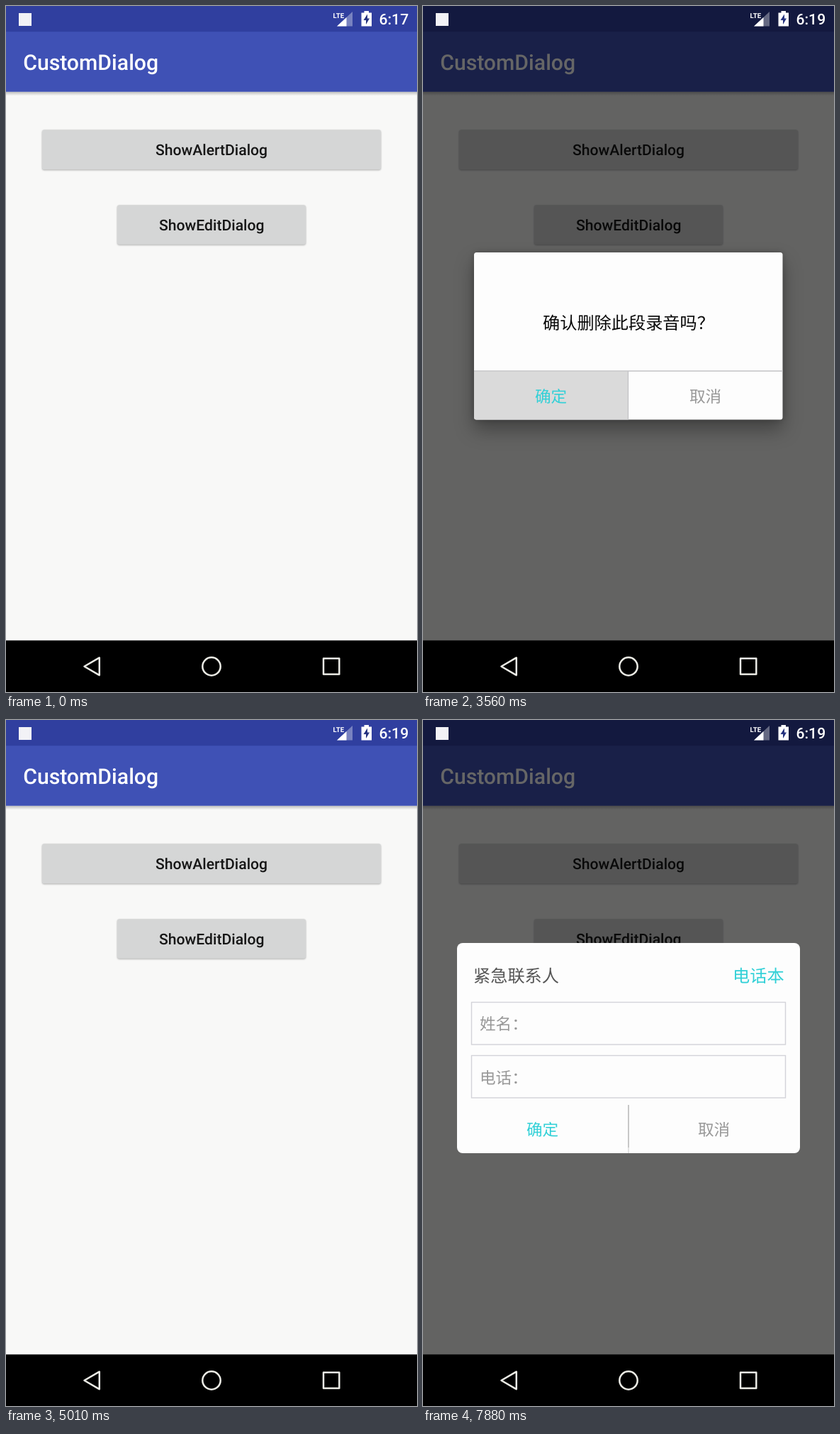
An HTML page for the animation above (8 s loop, 580 by 966 pixels).

```html
<!DOCTYPE html>
<html lang="zh-CN">
<head>
<meta charset="utf-8">
<title>CustomDialog</title>
<style>
  html, body { margin: 0; width: 100%; height: 100%; overflow: hidden; background: #000; }
  svg { display: block; width: 580px; height: 966px; }
  text { font-family: Roboto, "Noto Sans CJK SC", "Noto Sans CJK", sans-serif; text-rendering: geometricPrecision; }
  .zh { font-family: "Noto Sans CJK SC", "Noto Sans CJK", "Noto Sans", sans-serif; font-size: 24.2px; }
  .small { font-size: 22.6px; }
  .label { font-size: 21.15px; font-weight: 500; fill: #161616; text-anchor: middle; }
  .cyan { fill: #31d0d7; }
  .grey { fill: #989898; }
  .field { fill: none; stroke: #d3d3d9; stroke-width: 1.4; }
  .cell { fill: #dadada; }
  .nav { fill: none; stroke: #ecece6; stroke-width: 2.5; stroke-linejoin: round; }
  #alert > .sheet { filter: drop-shadow(0 0 5px rgba(0,0,0,.22)) drop-shadow(0 14px 13px rgba(0,0,0,.32)); }
</style>
</head>
<body>
<svg viewBox="0 0 580 966">
  <defs>
    <linearGradient id="barShadow" x2="0" y2="1">
      <stop offset="0" stop-opacity=".24"/>
      <stop offset="1" stop-opacity="0"/>
    </linearGradient>
  </defs>

  <!-- App screen -->
  <rect width="580" height="894" fill="#f8f8f7"/>
  <rect y="120.8" width="580" height="5.5" fill="url(#barShadow)"/>
  <rect width="580" height="120.8" fill="#3f51b5"/>
  <rect width="580" height="36.2" fill="#303f9f"/>
  <text x="24.2" y="90.3" font-size="30.2" font-weight="500" fill="#fff">CustomDialog</text>

  <rect id="btnA" x="51" y="174.3" width="478" height="56" rx="3" fill="#d5d6d6"/>
  <rect id="ripA" x="51" y="174.3" width="478" height="56" rx="3"/>
  <text class="label" x="290" y="210.2">ShowAlertDialog</text>
  <rect id="btnB" x="157" y="280.3" width="266" height="55.5" rx="3" fill="#d5d6d6"/>
  <rect id="ripB" x="157" y="280.3" width="266" height="55.5" rx="3"/>
  <text class="label" x="290.3" y="315.9">ShowEditDialog</text>

  <rect id="dim" width="580" height="894"/>

  <!-- Alert dialog -->
  <g id="alert">
    <rect class="sheet" x="72" y="347" width="435.5" height="235.5" rx="3.5" fill="#fdfdfd"/>
    <path id="alertOk" class="cell" d="M72 514.5H289.5V582.5H75.5A3.5 3.5 0 0 1 72 579Z"/>
    <path id="alertCancel" class="cell" d="M289.5 514.5H507.5V579A3.5 3.5 0 0 1 504 582.5H289.5Z"/>
    <path d="M72 514H507.5M289.5 514V582.5" fill="none" stroke="#c4c4c6" stroke-width="1.3"/>
    <text class="zh" x="169" y="454.5" fill="#080808">确认删除此段录音吗？</text>
    <text class="zh small cyan" x="158" y="557.5">确定</text>
    <text class="zh small grey" x="376" y="557.5">取消</text>
  </g>

  <!-- Contact dialog -->
  <g id="edit">
    <rect x="48" y="314" width="484" height="296" rx="8" fill="#fdfdfd"/>
    <path id="editCancel" class="cell" d="M290 542H532V602A8 8 0 0 1 524 610H290Z"/>
    <text class="zh" x="71" y="368.5" fill="#555">紧急联系人</text>
    <text class="zh cyan" x="437" y="368.5">电话本</text>
    <rect class="field" x="68.5" y="397.5" width="443" height="59.5"/>
    <rect class="field" x="68.5" y="472.5" width="443" height="59.5"/>
    <text class="zh small grey" x="80" y="436">姓名：</text>
    <text class="zh small grey" x="80" y="511.5">电话：</text>
    <rect id="caret" x="80" y="411" width="3" height="31" fill="#f53d7c"/>
    <path d="M290 542V602" stroke="#b9b9b9" stroke-width="1.6"/>
    <path d="M290 602V610" stroke="#dcdcdc" stroke-width="1.6"/>
    <text class="zh small cyan" x="146" y="585">确定</text>
    <text class="zh small grey" x="388" y="585">取消</text>
  </g>

  <!-- System bars -->
  <rect x="18" y="10" width="18" height="18" fill="#f2f2f6"/>
  <text x="461.5" y="16.5" font-size="9.6" font-weight="700" fill="#fff">LTE</text>
  <path d="M467 28.5L489 8V28.5Z" fill="#fff" opacity=".35"/>
  <path d="M467 28.5L480.5 16V28.5Z" fill="#fff"/>
  <path d="M501.5 9.5H505.5V7H512V9.5H516V28.5H501.5Z" fill="#fff"/>
  <path d="M510 11.5L504.5 20H508V26L513 17.5H510Z" fill="#26337f"/>
  <text id="clock" x="526.5" y="26.3" font-size="21.15" font-weight="500" fill="#fff"></text>
  <rect y="893.4" width="580" height="73" fill="#000"/>
  <path class="nav" d="M110.5 930L131.8 917.7V942.3Z"/>
  <circle class="nav" cx="290" cy="930" r="12.7"/>
  <rect class="nav" x="448" y="918.7" width="22.3" height="22.3"/>
</svg>
<script>
  const LOOP = 8000, FADE = 200, DIM = 0.6;
  const $ = id => document.getElementById(id);
  const ramp = (t, from, length) => Math.min(1, Math.max(0, (t - from) / length));
  const within = (t, spans) => spans.some(([a, b]) => t >= a && t < b);
  const easeOut = p => 1 - (1 - p) ** 4;
  const show = (id, alpha) => $(id).setAttribute('opacity', +alpha);

  const buttons = [
    { key: 'A', down: 1810, up: 2270, clear: 2700 },
    { key: 'B', down: 5860, up: 6020, clear: 6550 }
  ];
  const dialogs = [
    { id: 'alert', open: 2286, close: 4810 },
    { id: 'edit', open: 6040, close: Infinity }
  ];
  // Spans of time in which each part is visible
  const spans = {
    alertOk: [[3560, 3880]],
    alertCancel: [[4570, 5010]],
    editCancel: [[6750, 7160]],
    caret: [[6040, 6550], [7200, 7880]]
  };

  function drawButton(t, { key, down, up, clear }) {
    const lift = ramp(t, down, 100) - ramp(t, up, 100);
    const ripple = 0.25 * ramp(t, down, 200) + 0.75 * ramp(t, up, 90)
      - ramp(t, up + 120, clear - up - 120);
    $('btn' + key).style.filter =
      `drop-shadow(0 ${1 + lift}px ${1 + 3 * lift}px rgba(0,0,0,${0.3 + 0.12 * lift}))`;
    show('rip' + key, 0.08 * ripple);
  }

  function draw(t) {
    $('clock').textContent = t < 40 ? '6:17' : '6:19';
    buttons.forEach(b => drawButton(t, b));
    let dim = 0;
    for (const { id, open, close } of dialogs) {
      const enter = ramp(t, open, FADE), leave = ramp(t, close, FADE);
      dim += enter - leave;
      show(id, easeOut(enter) - easeOut(leave));
    }
    show('dim', DIM * dim);
    for (const id in spans) show(id, within(t, spans[id]));
  }

  const start = performance.now();
  function tick() {
    draw((performance.now() - start) % LOOP);
    requestAnimationFrame(tick);
  }
  tick();
</script>
</body>
</html>
```
